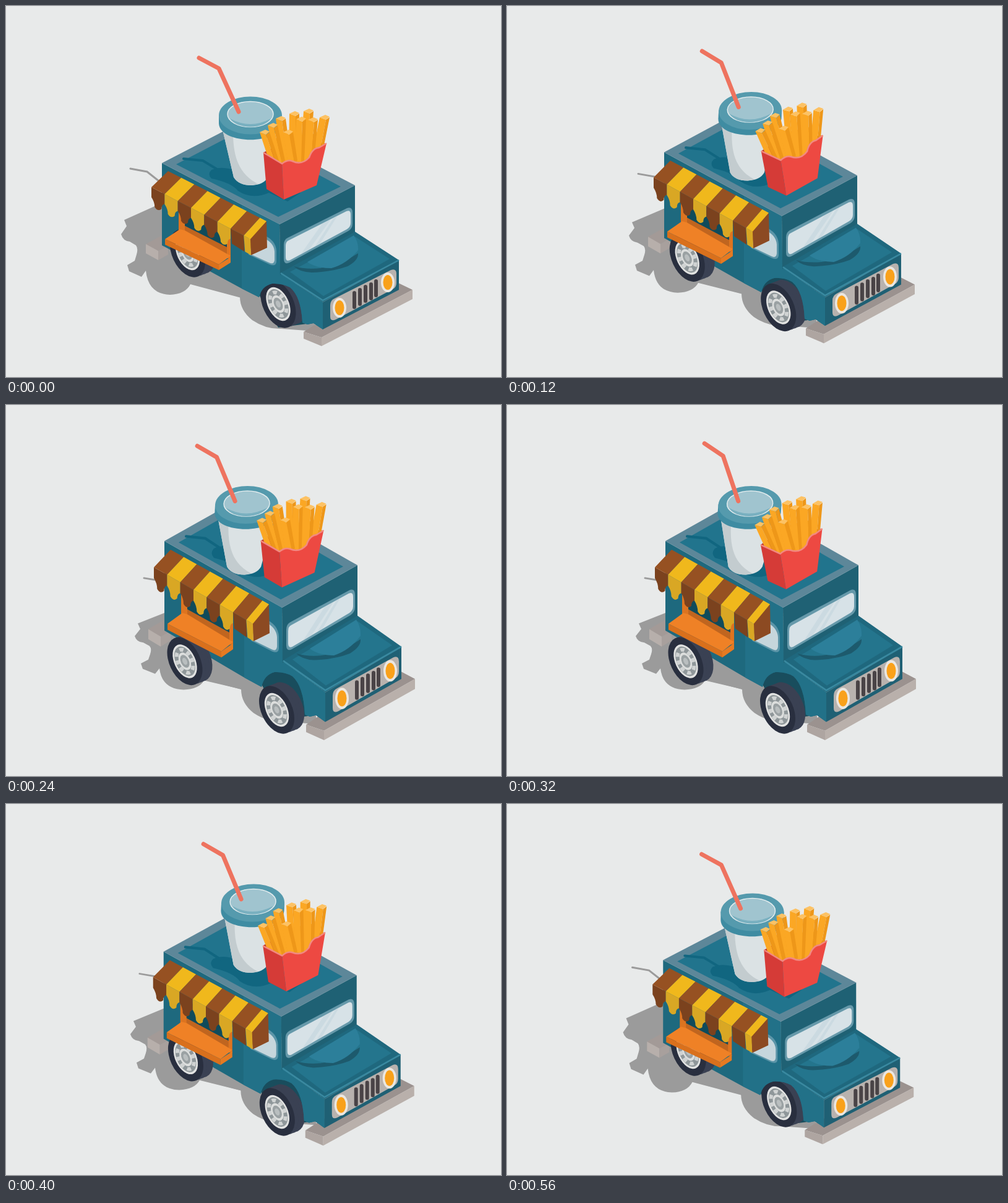
Recreate the animation shown at these times as an HTML page. Size 800 px wide and 600 px high, loop 600 ms.

```html
<!DOCTYPE html>
<html lang="en">
<head>
<meta charset="utf-8">
<title>Food truck</title>
<style>
  html, body { margin: 0; width: 100%; height: 100%; overflow: hidden; background: #e8eaea; }
  svg { display: block; width: 100vw; height: 100vh; }
</style>
</head>
<body>
<svg viewBox="0 0 800 600">
  <defs>
    <g id="wheel">
      <g fill="#3a4153">
        <ellipse rx="25" ry="41" transform="translate(16 -6) rotate(-25)"/>
        <ellipse rx="25" ry="41" transform="translate(11 -4) rotate(-25)"/>
        <ellipse rx="25" ry="41" transform="translate(5.500 -2) rotate(-25)"/>
      </g>
      <g transform="rotate(-25)">
        <ellipse rx="25" ry="41" fill="#292f3f"/>
        <ellipse rx="17" ry="29" fill="#e2e3e2"/>
        <ellipse rx="14.500" ry="25.500" fill="#8f979a"/>
        <ellipse rx="11.500" ry="20" fill="none" stroke="#d0d3d3" stroke-width="6" stroke-dasharray="6.500 6"/>
        <ellipse rx="9" ry="15" fill="#dcdedd"/>
        <ellipse rx="6.500" ry="11" fill="#9aa1a3"/>
        <ellipse rx="3.500" ry="6" fill="#b9bebf"/>
      </g>
    </g>
  </defs>

  <!-- ground shadow -->
  <g fill="#9b9b9b">
    <g id="rearShade">
      <path d="M201 263L228 268 252 287" fill="none" stroke="#9b9b9b" stroke-width="3" stroke-linecap="round"/>
      <path d="M262 314L191 346 195 356 186 369Q189 380 200 381L210 387Q214 392 211 402L208 412 196 419 199 429 219 438 226 428Q230 466 265 467 290 466 298 450L380 472 420 440 300 340Z"/>
    </g>
    <path id="frontShade" d="M300 400L300 449 378 470Q378 492 398 508 420 523 445 522L500 526 495 460Z"/>
  </g>

  <g class="van">
    <path fill="#a39a97" d="M226 385L252 371 262 376 262 389 245 396Z"/>
    <path fill="#b7afab" d="M226 385L246 396V411L226 400Z"/>
    <path fill="#a8a09d" d="M246 396L262 388V402L246 411Z"/>
    <path fill="#9b928f" d="M481 527L500 515 630 446 657 459 510 536Z"/>
    <path fill="#aea5a1" d="M481 527L510 536V550L481 538Z"/>
    <path fill="#b9b0ab" d="M510 536L657 459V474L510 550Z"/>
    <path fill="#194d5d" d="M406 462Q412 444 440 444 476 452 486 514L440 520Z"/>
  </g>

  <use id="frontWheel" href="#wheel"/>

  <g class="van">
    <path fill="#1e697e" d="M252 254L442 353 443 432 512 479V523L497 513 487 515 479 512Q477 470 459 455 446 448 430 449 413 453 409 471L381 457 252 387Z"/>
    <path fill="#227188" d="M381 322L442 353 443 432 512 479V523L497 513 487 515 479 512Q477 470 459 455 446 448 430 449 413 453 409 471L381 457Z"/>
    <path fill="#1f6174" d="M442 353L564 290V368L443 435Z"/>
  </g>

  <use id="rearWheel" href="#wheel"/>

  <g class="van">
    <!-- side window and hatch -->
    <path fill="#5b95a8" d="M392 372L415 370Q436 378 437 396V414Q436 422 426 418L392 402Z"/>
    <path fill="#c6d6dc" d="M392 376L414 374Q433 382 434 397V411Q433 419 425 415L392 400Z"/>
    <path fill="#0f4b5b" d="M282 325L362 365V402L282 362Z"/>
    <path fill="#c0651f" d="M288 355L359 391V402L288 367Z"/>
    <path fill="#dd7420" d="M279 322L289 327V368H279ZM357 366L363 369V408H357Z"/>
    <path fill="#ef8126" d="M257 377L281 361 289 363 363 404 344 418Z"/>
    <path fill="#d9701c" d="M257 377L344 418V427L257 386Z"/>
    <path fill="#e57a22" d="M344 418L363 406V415L344 427Z"/>

    <!-- roof -->
    <path fill="#5d8799" d="M252 254L374 191 564 290 442 353Z"/>
    <path fill="#21748d" d="M275 256L375 204 541 292 440 341Z"/>
    <path fill="#116680" d="M332 265Q350 257 376 268L425 282 476 302 455 316 425 302Q398 314 375 299 365 286 332 279 325 272 332 265Z"/>
    <path fill="none" stroke="#116680" stroke-width="4" stroke-linecap="round" stroke-linejoin="round" d="M287 247L318 250 346 267"/>

    <g id="awning"></g>

    <!-- windscreen -->
    <path fill="#6699aa" d="M455 375L551 327Q560 324 560 334V352Q560 360 553 364L458 415Q449 419 449 409V386Q449 378 455 375Z"/>
    <path fill="#d7e2e7" d="M457 379L550 332Q557 329 557 337V351Q557 357 551 361L459 411Q452 414 452 406V388Q452 381 457 379Z"/>
    <path fill="#bfd3db" d="M476 402L511 352 525 345 490 394ZM499 389L530 342 536 339 507 385Z" opacity=".5"/>

    <!-- bonnet -->
    <path fill="#1f687e" d="M443 432L564 365 635 411 512 479Z"/>
    <path fill="#24758d" d="M459 430L564 373 620 409 513 469Z"/>
    <path fill="#1d5a6d" d="M465 421Q498 430 540 417L569 400Q570 411 552 421 527 430 494 431 474 430 465 421Z"/>
    <path fill="#2c7f9a" d="M487 414L562 371Q570 382 569 395 551 417 526 424 501 424 487 414Z"/>
    <path fill="#1f6074" d="M512 479L635 411V459L512 523Z"/>
    <path fill="none" stroke="#3989a0" stroke-width="2.500" d="M444 432L512 476 635 411"/>
    <path fill="#b8b2ae" d="M531 473L622 427Q631 424 631 433V448Q631 455 625 458L533 507Q524 511 524 502V484Q524 476 531 473Z"/>
    <path stroke="#494346" stroke-width="6" stroke-linecap="round" d="M563 464v23M572 459v23M581 454v23M590 450v23M598 445v23"/>
    <g fill="#ebe7e1">
      <ellipse cx="539" cy="488" rx="11" ry="16"/>
      <ellipse cx="617" cy="447" rx="11" ry="16"/>
    </g>
    <g fill="#f9a11b">
      <ellipse cx="539" cy="488" rx="7.500" ry="12"/>
      <ellipse cx="617" cy="447" rx="7.500" ry="12"/>
    </g>
  </g>

  <g id="cup">
    <path fill="#dbe2e4" d="M350 200L368 277Q376 290 397 290 417 289 423 277L440 200Z"/>
    <path fill="#c3cccf" d="M350 200L368 277Q376 290 397 290L408 288C380 274 367 250 367 205Z"/>
    <path fill="#3f8ca2" d="M344 176V190C346 225 444 225 446 190V176Z"/>
    <ellipse cx="395" cy="177" rx="51" ry="30.500" fill="#559aad"/>
    <ellipse cx="395" cy="175" rx="37" ry="20.500" fill="#a0c4cf" stroke="#e2ecee" stroke-width="1.500"/>
    <path fill="#79b0c0" d="M362 182Q395 200 428 182 419 195 395 195.500 371 195 362 182Z"/>
  </g>
  <path id="straw" fill="none" stroke="#ee735f" stroke-width="7" stroke-linecap="round" stroke-linejoin="round" d="M312 84L344 101 376 171"/>

  <g id="fries">
    <path fill="#b9322f" d="M416 237L444 222 518 222 498 252 446 256Z"/>
    <path fill="#e28f15" d="M424 215L512 205 500 250 440 254Z"/>
    <g id="sticks"></g>
    <path fill="#d53b37" d="M416 237L446 255 449 313 421 296Z"/>
    <path fill="#ed4942" d="M446 255Q455 248 463 251 478 258 490 245 495 230 506 229L518 222 502 290 449 313Z"/>
    <path fill="none" stroke="#f28a80" stroke-width="2.500" stroke-linejoin="round" d="M416 237L446 255Q455 248 463 251 478 258 490 245 495 230 506 229L518 222"/>
  </g>
</svg>
<script>
  const $ = id => document.getElementById(id);
  const poly = (fill, ...pts) => `<path fill="${fill}" d="M${pts.join('L')}Z"/>`;

  // Awning: sloped stripes with a dripping valance
  const topAt = u => [262 + u, 267 + u * .509];
  const lowAt = u => [235 + u * 1.006, 293 + u * .528];
  let awning = poly('#8c4a22', [421, 348], [422, 391], [396, 403], [394, 377]);
  for (let i = 0; i < 8; i++) {
    const u = i * 21.2, v = Math.min(u + 21.2, 159);
    const a = lowAt(u), b = lowAt(v), yellow = i % 2;
    const hem = i < 6
      ? `L${b[0]} ${b[1] + 16}q-5 1-5 8q-6 5-11-3q0-8-5.300-16`
      : `L${b[0] + 1} ${b[1] + 26}L${a[0] + 2} ${a[1] + (i > 6 ? 26 : 24)}`;
    awning += `<path fill="${yellow ? '#d9a724' : '#7b421e'}" d="M${a}L${b}${hem}Z"/>`;
    awning += poly(yellow ? '#f0b81c' : '#965122', topAt(u), topAt(v), b, a);
  }
  $('awning').innerHTML = awning;

  // Fries, back to front: tip x, tip y, foot x
  const sticks = [[489, 168, 482], [466, 172, 464], [515, 178, 500], [444, 180, 452],
    [477, 181, 473], [496, 182, 489], [431, 191, 442], [418, 202, 432], [456, 202, 462]];
  $('sticks').innerHTML = sticks.map(([x, y, f]) =>
    poly('#fba724', [x - 8, y + 2], [x + 2, y + 6], [f + 4, 254], [f - 7, 250]) +
    poly('#ee9719', [x + 2, y + 6], [x + 8, y + 2], [f + 9, 250], [f + 4, 254]) +
    poly('#fdc263', [x - 8, y + 2], [x + 1, y - 2], [x + 8, y + 1], [x + 2, y + 6])).join('');

  // Poses at every second step
  const keys = {
    stretch:   [0, .25, .75, 1, 1, .68, .07],
    base:      [0, -3, -6, -8, -8, 2.5, .3],
    lidX:      [0, -1, -3, -6, -2.5, 4, 1.5],
    footX:     [0, -4.5, -10, -11, -10.5, -.5, .5],
    cupY:      [0, -3.5, -11.5, -15.5, -15.5, -17, -2],
    strawTilt: [0, 2, 4, 2, 6, 2, .7],
    boxX:      [0, 6, -2, -3, 2, 4, -.7],
    boxY:      [0, -1, -12, -18, -15, -10, -1],
    boxTilt:   [0, -8.2, -2.5, -1, -6.3, -3.7, 0],
    frontY:    [0, 3, 8, 11, 11, 16, 2]
  };

  // Cubic curve through the poses, closed into a loop
  function at(list, step) {
    const p = step / 2, i = Math.floor(p), f = p - i;
    const [a, b, c, d] = [-1, 0, 1, 2].map(o => list[(i + o + 7) % 7]);
    return b + f / 2 * (c - a + f * (2 * a - 5 * b + 4 * c - d + f * (3 * (b - c) + d - a)));
  }

  const vans = document.querySelectorAll('.van');
  const put = (id, value) => $(id).setAttribute('transform', value);

  function draw(ms) {
    // 40 ms steps with a pause at the eleventh pose
    const tick = Math.floor(ms % 600 / 40);
    const step = tick < 11 ? tick : Math.max(10, tick - 2);
    const s = {};
    for (const name in keys) s[name] = at(keys[name], step);
    const k = s.stretch, scale = 1 + k * .088, squash = .115 * k;
    const van = `matrix(1 0 0 ${scale} ${4 * k} ${550 * (1 - scale) + s.base})`;
    vans.forEach(g => g.setAttribute('transform', van));
    put('rearWheel', `translate(${293.5 - 4.5 * k} ${400 + 14.5 * k})`);
    put('frontWheel', `translate(${440 - 2.5 * k} ${482 + s.frontY})`);
    put('rearShade', `matrix(1 0 0 ${1 - squash} ${22 * k} ${410 * squash})`);
    put('frontShade', `translate(${2 * k} ${-10 * k})`);
    const skew = (s.footX - s.lidX) / 103;
    put('cup', `matrix(1 0 ${skew} 1 ${s.lidX - skew * 177} ${s.cupY})`);
    put('straw', `translate(${s.lidX} ${s.cupY}) rotate(${s.strawTilt} 377 173)`);
    put('fries', `translate(${s.boxX} ${s.boxY}) rotate(${s.boxTilt} 449 313)`);
  }

  const start = performance.now();
  function loop() {
    draw(performance.now() - start);
    requestAnimationFrame(loop);
  }
  loop();
</script>
</body>
</html>
```
